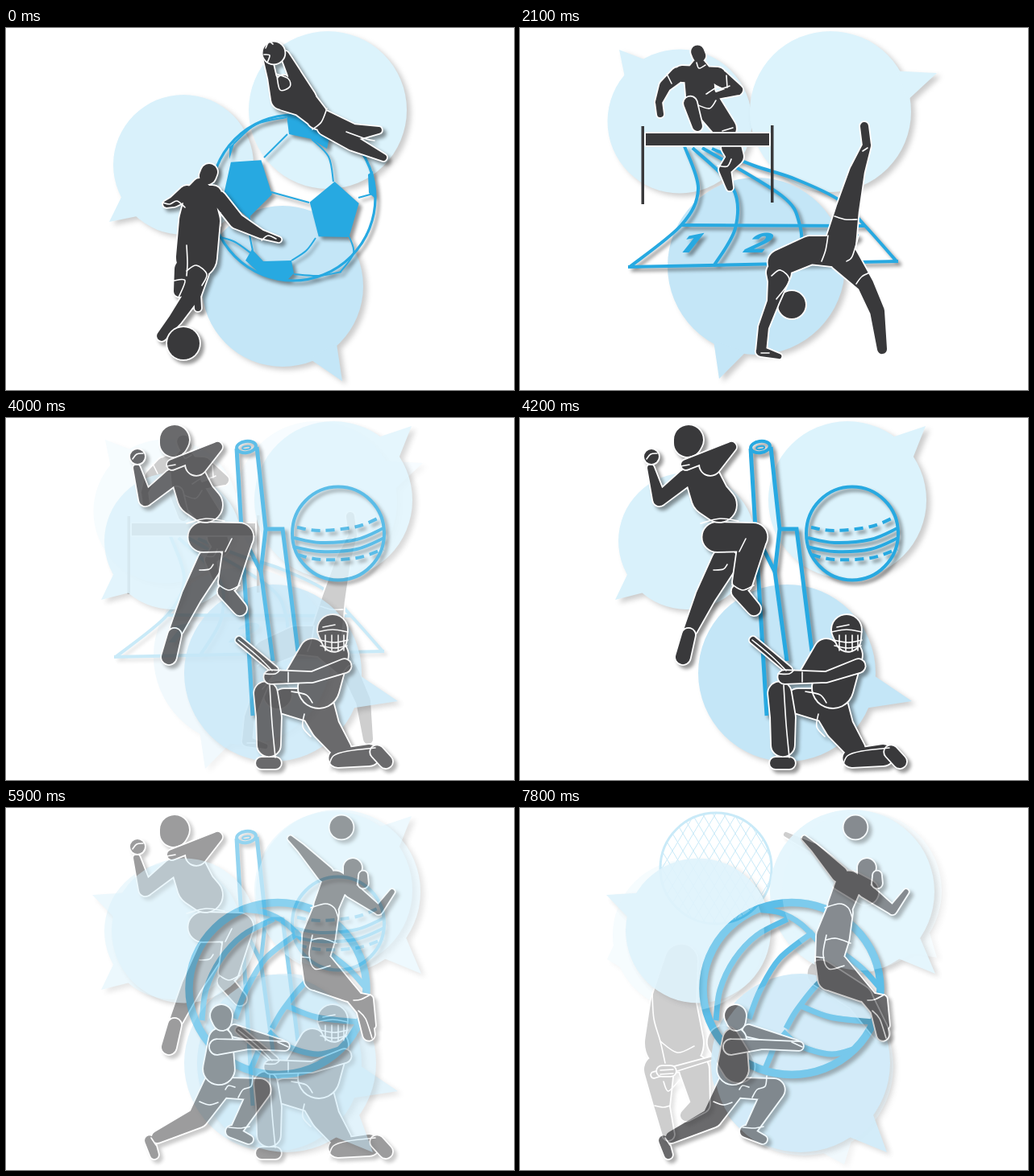
An HTML page for the animation above (8000 ms loop, 630x450 px).

```html
<!DOCTYPE html>
<html lang="en">
<head>
<meta charset="utf-8">
<title>Sports</title>
<style>
html, body { margin: 0; width: 100%; height: 100%; overflow: hidden; background: #fff; }
svg { display: block; width: 630px; height: 450px; }
.fig { fill: #39393b; stroke: #fff; stroke-width: 3.6; stroke-linejoin: round; paint-order: stroke; }
.bare { fill: #39393b; }
.white { fill: none; stroke: #fff; stroke-width: 1.6; stroke-linecap: round; }
.blue { fill: none; stroke: #27a9e1; }
.solid { fill: #27a9e1; }
.shade { filter: drop-shadow(4px 4px 2px rgba(0,0,0,.42)); }
.soft { filter: drop-shadow(5px 4px 3px rgba(0,0,0,.2)); }
.dim { filter: brightness(0) opacity(.9); }
.lit { filter: brightness(0) invert(1); }
.num { font: italic 900 34px Roboto, Lato, sans-serif; fill: #27a9e1; }
</style>
</head>
<body>
<svg id="stage" viewBox="0 0 630 450"></svg>
<script>
const SKY = '#d9f1fb', PALE = '#dcf3fc', DEEP = '#c4e6f7';

const group = (text, size) => {
  const n = text.split(' ').map(Number);
  return Array.from({ length: n.length / size }, (_, i) => n.slice(i * size, i * size + size));
};
const polar = (x, y, r, a, ry = r) => [x + r * Math.cos(a), y + ry * Math.sin(a)].map(v => v.toFixed(1));

// Outline around two circles of a limb.
function capsule([x, y, r], [u, v, s]) {
  const a = Math.atan2(v - y, u - x);
  const b = Math.acos(Math.max(-1, Math.min(1, (r - s) / Math.hypot(u - x, v - y))));
  const wide = b < Math.PI / 2 ? 1 : 0;
  return `M${polar(x, y, r, a + b)}A${r} ${r} 0 ${wide} 1 ${polar(x, y, r, a - b)}` +
    `L${polar(u, v, s, a - b)}A${s} ${s} 0 ${1 - wide} 1 ${polar(u, v, s, a + b)}Z`;
}
// Every limb is a chain of joints: x, y, radius.
const body = (...limbs) => `<path class="fig" d="${limbs.map(l => {
  const j = group(l, 3);
  return j.slice(1).map((p, i) => capsule(j[i], p)).join('');
}).join('')}"/>`;

// Smooth open curve through a few points.
function curve(text) {
  const p = group(text, 2), at = i => p[Math.max(0, Math.min(p.length - 1, i))];
  return 'M' + p[0] + p.slice(1).map((c, i) => {
    const a = at(i - 1), b = p[i], e = at(i + 2);
    return `C${b.map((v, k) => v + (c[k] - a[k]) / 6)} ${c.map((v, k) => v - (e[k] - b[k]) / 6)} ${c}`;
  }).join('');
}
const white = (...list) => list.map(s => `<path class="white" d="${curve(s)}"/>`).join('');
const blue = (w, ...list) => list.map(s => `<path class="blue" stroke-width="${w}" d="${curve(s)}"/>`).join('');
const poly = (w, ...list) => list.map(s => `<polyline class="blue" stroke-width="${w}" points="${s}"/>`).join('');
const solid = (...list) => list.map(s => `<polygon class="solid" points="${s}"/>`).join('');
const penta = (x, y, rx, ry, turn) =>
  solid([0, 1, 2, 3, 4].map(i => polar(x, y, rx, (turn + i * 72) * Math.PI / 180, ry)).join(' '));
const disc = (x, y, r) => `<circle class="fig" cx="${x}" cy="${y}" r="${r}"/>`;
const ring = (x, y, rx, ry, w) =>
  `<ellipse class="blue" stroke-width="${w}" cx="${x}" cy="${y}" rx="${rx}" ry="${ry}"/>`;
const shade = (...parts) => `<g class="shade">${parts.join('')}</g>`;
const num = (s, x) => `<text class="num" transform="translate(${x} 279) skewX(-28) scale(1.5 1)">${s}</text>`;

// Speech bubble whose tail points at (u, v).
function bubble(x, y, r, color, u, v) {
  const a = Math.atan2(v - y, u - x);
  const tail = u ? `<polygon points="${polar(x, y, r - 3, a - .2)} ${u},${v} ${polar(x, y, r - 3, a + .2)}"/>` : '';
  return `<g class="soft" fill="${color}"><circle cx="${x}" cy="${y}" r="${r}"/>${tail}</g>`;
}

const football = {
  back: [
    bubble(220, 170, 87, SKY, 128, 241),
    bubble(399, 102, 98, PALE),
    bubble(343, 321, 100, DEEP, 417, 439)
  ],
  front: [
    shade(
      ring(356, 211, 102, 103, 3.2),
      penta(299, 197, 32, 39, 15), penta(407, 229, 32, 38, 271),
      solid('348 108 351 132 379 138 398 150 405 118', '449 182 455 178 458 212 450 205',
        '297 289 305 275 319 290 354 289 357 305 348 314 318 308', '277 163 277 148 300 127 283 144'),
      blue(2, '349 132 320 161', '329 204 376 217', '379 138 400 160 406 191', '437 211 455 206',
        '384 261 372 277 354 289', '302 233 302 255 306 277', '266 260 284 266 304 280',
        '425 258 431 280 414 304', '357 306 388 308 416 303', '282 144 310 120 348 111')),
    shade(
      body('324 36 5 330 62 5 342 88 13', '346 34 5 358 58 8 368 90 17', '345 88 14 368 92 17 384 108 14',
        '344 66 8 346 76 8', '386 112 13 430 130 10 462 127 4', '398 122 12 430 143 9 468 161 4'),
      disc(332, 31, 13.5),
      white('322 25 326 17 331 20', '320 33 327 34 324 43', '398 100 391 117 380 126', '422 129 447 138 457 140',
        '335 57 350 63 352 73 340 77 336 60')),
    shade(
      body('252 179 10 250 184 10', '230 209 13 256 207 11', '240 195 8 240 208 17 240 240 25 236 285 25',
        '222 300 13 215 327 7', '240 305 11 232 330 10 210 362 8 193 383 6', '237 330 4 238 348 4',
        '264 212 9 286 240 9 316 256 5 338 263 3', '224 205 9 208 216 6 199 219 4'),
      white('194 217 203 219 212 215 222 223', '224 270 225 292 224 308', '224 302 236 295 249 306 243 320',
        '208 314 222 314 214 335', '317 264 325 258 335 262', '266 230 266 246'),
      disc(220, 392, 20))
  ]
};

const athletics = {
  back: [
    bubble(198, 116, 89.5, SKY, 123, 27),
    bubble(385, 104, 100, PALE, 517, 56),
    bubble(293, 296, 110, DEEP, 247, 436)
  ],
  front: [
    shade(
      blue(4, '204 147 221 200 200 245 136 297', '214 149 264 199 267 249 240 296',
        '226 149 324 208 347 245 350 292', '238 150 290 171 342 188 396 214 428 246 467 290'),
      poly(4, '134 297 469 290', '201 245 428 246'),
      num(1, 192), num(2, 276), num(3, 382)),
    body('220 29 8 222 34 8', '201 57 10 245 59 10', '222 46 8 222 62 18 224 84 18 254 125 14',
      '196 58 9 180 72 7 172 92 4 174 107 4', '248 62 10 270 77 6 244 84 4',
      '262 148 12 267 160 10 254 176 7 260 198 4'),
    body('211 93 8 220 122 6'),
    white('219 43 222 50 230 46', '182 57 188 69', '231 82 244 74 251 75 260 72', '256 59 257 74',
      '221 96 235 100 243 90', '251 128 264 124', '245 171 257 172 262 163'),
    '<g class="bare"><rect x="150.500" y="122" width="3.500" height="97"/><rect x="311" y="121" width="3.500" height="96"/></g>',
    '<rect class="fig" x="156" y="131" width="153" height="15"/>',
    disc(337, 344, 17),
    body('427 122 5 430 146 5 418 178 9 406 226 14 397 270 19', '397 278 19 360 276 17 323 292 16',
      '400 284 18 428 318 10 443 352 9 449 399 6', '321 304 15 320 314 12 314 340 7 302 372 6 299 402 6 321 408 3'),
    white('390 234 403 238 418 238', '382 258 379 276 374 290', '417 318 424 309 434 304', '420 258 412 284 405 290',
      '312 308 323 301 334 314 318 337', '299 404 309 404', '425 153 431 149')
  ]
};

const cricket = {
  back: [
    bubble(207, 153, 85, SKY, 118, 226),
    bubble(406, 102, 98, PALE, 503, 10),
    bubble(331, 317, 110, DEEP, 486, 352)
  ],
  front: [
    shade(
      '<g transform="rotate(-8 298 36)">' + ring(298, 36, 12, 7, 4) + ring(298, 37, 5, 2, 2) + '</g>',
      poly(5, '286 38 306 370', '311 36 322 138 316 191 302 163', '316 191 331 302', '322 138 343 138 362 290')),
    shade(
      ring(412, 143.5, 57, 58, 4),
      blue(4, '357 149 390 155 435 151 468 137', '356 160 390 166 435 163 469 149'),
      '<g stroke-dasharray="11 7">' +
        blue(4, '361 136 390 140 435 135 467 122', '362 170 390 176 435 174 468 163') + '</g>'),
    shade(
      body('254 178 16 230 222 12 212 262 8'),
      body('209 270 8 202 297 9'),
      body('244 148 18 289 148 17 276 204 12', '272 216 9 290 237 8'),
      body('224 68 20 236 98 23 247 108 21', '206 74 10 173 101 8 162 62 4'),
      body('209 27 18 208 31 17'),
      body('236 58 13 262 36 6 206 58 6'),
      disc(163, 48, 9),
      white('157 51 162 45 170 44', '199 60 210 58', '263 207 276 214 290 208', '272 166 280 150',
        '240 189 252 188 257 182', '224 131 248 125 271 128')),
    shade(
      body('345 352 15 385 358 21 396 384 17 416 412 12', '412 423 11 450 419 13'),
      body('460 415 8 471 427 8'),
      body('322 342 14 326 372 15 326 406 14', '317 429 7 334 429 7'),
      body('404 295 20 388 335 25', '380 290 15 358 318 10'),
      body('289 276 4 333 313 4'),
      body('420 308 8 380 322 6 328 322 8'),
      body('405 263 18 407 275 15'),
      white('288 276 312 296 330 314', '320 318 334 318 340 313', '350 316 350 328', '386 266 405 263 424 266',
        '393 260 408 257', '389 276 407 279 424 276', '390 283 407 286 423 283',
        ...[396, 404, 412, 419].map(x => `${x} 270 ${x} 289`),
        '354 340 372 344 380 354', '370 368 368 384 378 396', '400 434 406 420 424 414 458 410',
        '327 332 330 380 334 422'))
  ]
};

const volleyball = {
  back: [
    bubble(221, 152.5, 90, SKY, 107, 108),
    bubble(412, 104, 102, PALE, 515, 206),
    bubble(348, 317, 111, DEEP, 455, 428)
  ],
  front: [
    shade(
      ring(337, 224.5, 110, 107, 9.5),
      blue(7, '243 264 248 226 266 188 294 158 332 138', '284 262 298 226 322 187 364 154',
        '292 126 322 130 348 144 372 168', '330 274 344 250 372 216 400 198', '348 246 385 260 436 266',
        '326 278 348 296 386 306 416 299', '318 290 304 324', '400 180 425 200 445 222')),
    shade(
      disc(416, 24, 14.5),
      body('353 38 3 366 50 5 396 82 10', '408 94 16 397 122 15', '428 102 9 462 127 5 479 104 3',
        '430 74 11 428 84 9 424 98 10', '396 130 16 388 160 20 383 190 16 384 212 14 424 232 8',
        '392 195 14 424 226 9 444 250 9 450 282 7', '440 236 5 450 238 5 454 270 4'),
      body('443 84 5 443 94 6'),
      white('378 124 396 119 407 124 412 136', '379 164 392 162 410 168', '366 185 377 186',
        '380 158 376 182 383 200 402 196', '431 239 440 238 452 232', '437 252 446 262 454 286')),
    shade(
      body('284 277 7 342 293 4'),
      body('262 346 17 238 385 12 188 409 7', '178 413 6 184 431 5', '276 348 12 315 350 13 286 400 7',
        '280 402 7 301 412 5'),
      body('266 288 14 264 324 19'),
      body('262 297 9 300 294 5 346 296 5'),
      body('267 258 13 268 265 11'),
      white('240 365 252 369 263 366', '288 360 294 350 304 346 306 333', '272 350 276 345 284 347',
        '276 397 290 398 302 396', '180 410 186 419', '337 291 350 297'))
  ]
};

const mesh = Array.from({ length: 24 }, (_, i) => `M${40 + i * 13} 0l90 150m0 -150l-90 150`).join('');
const hockey = {
  back: [
    bubble(209, 158, 94, SKY, 108, 188),
    bubble(424, 103, 99, PALE, 517, 186),
    bubble(352, 321, 111, DEEP, 402, 443)
  ],
  front: [
    '<clipPath id="head"><circle cx="243" cy="75" r="68"/></clipPath>',
    ring(243, 75, 69, 69, 3),
    `<path class="blue" clip-path="url(#head)" d="${mesh}"/>`,
    shade(
      body('330 33 3 364 50 6 400 88 15 428 104 16', '372 205 16 420 236 16 448 280 10'),
      body('200 190 20 190 245 28 191 292 36', '172 325 18 176 372 9 184 406 7',
        '216 325 18 224 368 11 206 382 7'),
      body('252 290 20 270 320 20'),
      body('166 332 3 238 311 1.5'),
      body('176 327 6 187 327 6'),
      white('164 230 166 262 174 290 180 317', '174 290 195 304 216 296', '174 326 190 325', '174 331 190 330',
        '167 370 178 372 186 370', '178 340 184 352 198 338'))
  ]
};

const scenes = [football, athletics, cricket, volleyball, hockey];
const stage = document.getElementById('stage');

// Each mask keeps an arriving scene faint over the bubbles of the leaving one.
stage.innerHTML = scenes.map((s, i) => `
  <mask id="veil${i + 1}" maskUnits="userSpaceOnUse" x="0" y="0" width="630" height="450">
    <rect width="630" height="450" fill="#fff"/>
    <g class="dim"><use href="#back${i}"/></g>
    <g class="lit"><use href="#front${i}"/></g>
  </mask>
  <g id="scene${i}"><g id="back${i}">${s.back.join('')}</g><g id="front${i}">${s.front.join('')}</g></g>`).join('');

const groups = scenes.map((_, i) => document.getElementById('scene' + i));
const LOOP = 8000, SPAN = 2100, HOLD = 1500, STEP = 200;
let shown = '';

function draw() {
  const t = performance.now() % LOOP;
  const k = Math.floor(t / SPAN), rest = t - k * SPAN;
  const step = rest < HOLD ? 0 : 1 + Math.floor((rest - HOLD) / STEP);
  if (shown !== k + ':' + step) {
    shown = k + ':' + step;
    groups.forEach((g, i) => {
      const alpha = i === k ? 1 - step / 4 : i === k + 1 ? step / 4 : 0;
      g.setAttribute('opacity', alpha);
      g.setAttribute('visibility', alpha ? 'visible' : 'hidden');
      if (i === k + 1 && step === 1) g.setAttribute('mask', `url(#veil${i})`);
      else g.removeAttribute('mask');
    });
  }
  requestAnimationFrame(draw);
}
draw();
</script>
</body>
</html>
```
